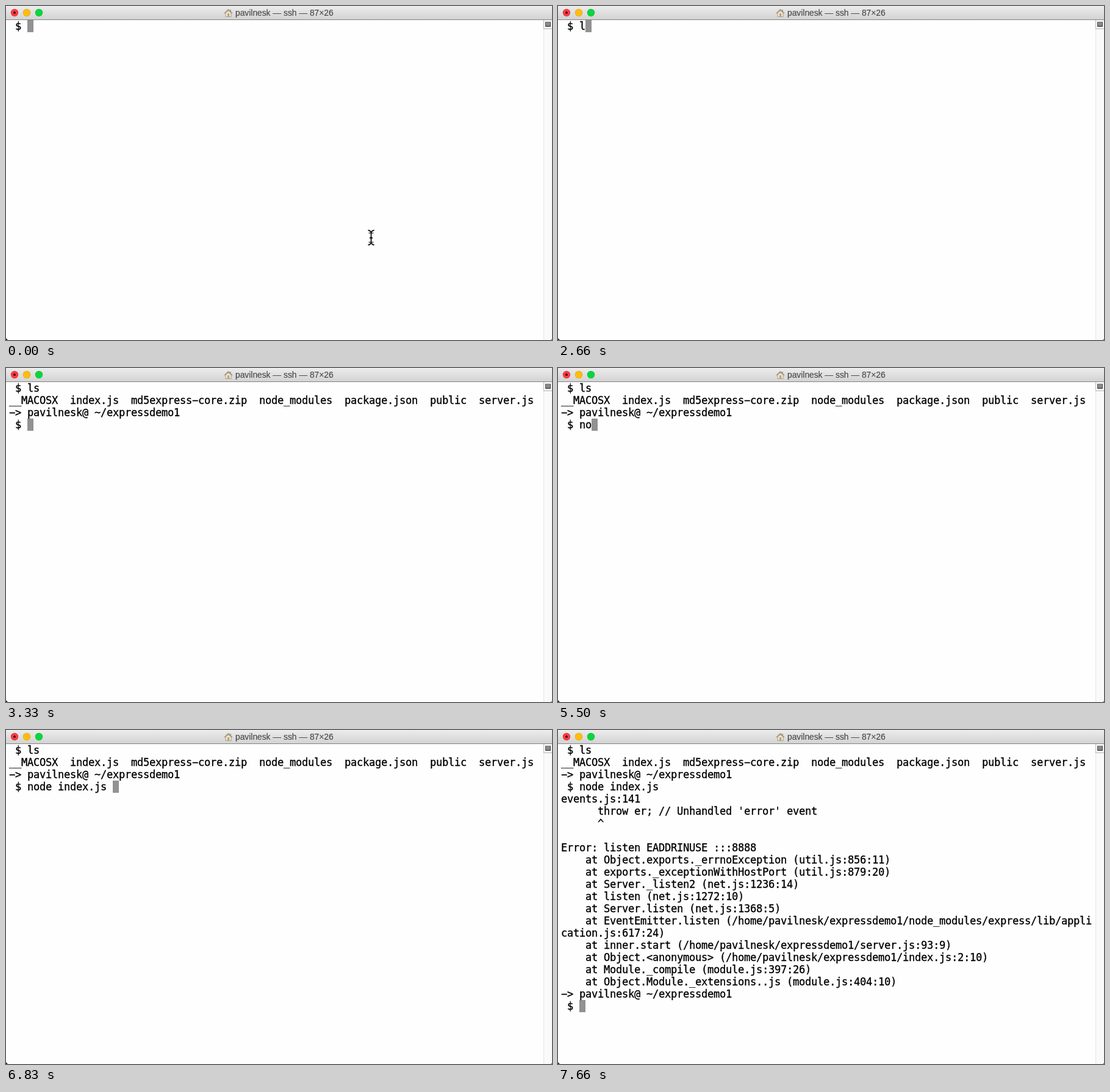
Animation, 895 px wide and 548 px high, one loop 8000 ms. Source, as an HTML page with a canvas:

```html
<!DOCTYPE html>
<html lang="en">
<head>
<meta charset="utf-8">
<title>Terminal</title>
<style>
html, body { margin: 0; width: 100%; height: 100%; overflow: hidden; background: #fefefe; }
canvas { display: block; }
</style>
</head>
<body>
<canvas id="stage" width="895" height="548"></canvas>
<script>
const ctx = document.getElementById('stage').getContext('2d');
const W = 895, H = 548, LOOP = 8000;
const CELL = 10, ROW = 20, LEFT = 5, TOP = 23;
const USER = 'pavilnesk';
const HOME = `/home/${USER}/expressdemo1`;
const PROMPT = ' $ ';

const listing = [
  '__MACOSX  index.js  md5express-core.zip  node_modules  package.json  public  server.js',
  `-> ${USER}@ ~/expressdemo1`
];

const trace = [
  'events.js:141',
  "      throw er; // Unhandled 'error' event",
  '      ^',
  '',
  'Error: listen EADDRINUSE :::8888',
  '    at Object.exports._errnoException (util.js:856:11)',
  '    at exports._exceptionWithHostPort (util.js:879:20)',
  '    at Server._listen2 (net.js:1236:14)',
  '    at listen (net.js:1272:10)',
  '    at Server.listen (net.js:1368:5)',
  `    at EventEmitter.listen (${HOME}/node_modules/express/lib/appli`,
  'cation.js:617:24)',
  `    at inner.start (${HOME}/server.js:93:9)`,
  `    at Object.<anonymous> (${HOME}/index.js:2:10)`,
  '    at Module._compile (module.js:397:26)',
  '    at Object.Module._extensions..js (module.js:404:10)',
  listing[1]
];

// [time, characters typed so far]
const firstKeys = [[0, 0], [2660, 1], [3000, 2]];
const secondKeys = [[3330, 0], [5500, 2], [5660, 3], [5830, 5], [6000, 6], [6160, 7], [6660, 8], [6830, 14]];
const LISTED = 3330, ENTERED = 7500, FAILED = 7660;

function typed(command, keys, t) {
  const count = keys.filter(k => k[0] <= t).pop()[1];
  return PROMPT + command.slice(0, count);
}

function screenLines(t) {
  const lines = [typed('ls', firstKeys, t)];
  if (t >= LISTED) lines.push(...listing, typed('node index.js ', secondKeys, t));
  if (t >= FAILED) lines.push(...trace, PROMPT);
  else if (t >= ENTERED) lines.push('');
  return lines;
}

function rect(x, y, w, h, color) {
  ctx.fillStyle = color;
  ctx.fillRect(x, y, w, h);
}

function disc(x, y, r, color) {
  ctx.fillStyle = color;
  ctx.beginPath();
  ctx.arc(x, y, r, 0, Math.PI * 2);
  ctx.fill();
}

function shape(points, color) {
  ctx.fillStyle = color;
  ctx.beginPath();
  points.forEach(([x, y]) => ctx.lineTo(x, y));
  ctx.fill();
}

// Text with a thin outline for a slightly heavier stroke
function label(text, x, y, weight) {
  ctx.lineWidth = weight;
  ctx.fillText(text, x, y);
  ctx.strokeText(text, x, y);
}

function light(x, fill, rim) {
  disc(x, 11, 6.2, rim);
  disc(x, 11, 5.5, fill);
}

function house() {
  shape([[359.5, 11], [364.5, 6.5], [369.5, 11], [369.5, 18], [359.5, 18]], '#a99f8e');
  shape([[360.5, 11.5], [364.5, 8], [368.5, 11.5], [368.5, 17], [360.5, 17]], '#ece5d3');
  rect(363, 12, 3, 5, '#c2a468');
  rect(367, 6, 2, 3, '#b5a694');
  ctx.strokeStyle = '#a18e7c';
  ctx.lineWidth = 1.3;
  ctx.beginPath();
  ctx.moveTo(358, 12);
  ctx.lineTo(364.5, 5.7);
  ctx.lineTo(371, 12);
  ctx.stroke();
}

function titleBar() {
  const g = ctx.createLinearGradient(0, 0, 0, 22);
  g.addColorStop(0, '#ececec');
  g.addColorStop(1, '#d3d3d3');
  rect(0, 0, W, 22, g);
  rect(0, 0, W, 1, '#f3f3f3');
  rect(0, 22, W, 1, '#828282');
  light(14, '#fc3b46', '#e2343f');
  disc(14, 11, 2, '#47060a');
  light(34, '#fdbd10', '#e3a611');
  light(54, '#0ad63f', '#0fbd39');
  house();
  ctx.font = '13.8px "Liberation Sans", Arial, sans-serif';
  ctx.fillStyle = ctx.strokeStyle = '#4c4c4c';
  label(`${USER} — ssh — 87×26`, 376, 16, 0.2);
}

function scrollBar() {
  rect(881, 23, 14, H - 23, '#fafafa');
  rect(881, 23, 1, H - 23, '#e6e6e6');
  rect(881, 23, 14, 15, '#b8b8b8');
  rect(882, 23, 13, 14, '#f6f6f6');
  rect(884, 26, 9, 8, '#4a4a4a');
  for (let y = 27; y < 33; y += 2) rect(885, y, 7, 1, '#c9c9c9');
}

function corners() {
  shape([[0, H - 3], [3, H], [0, H]], '#222');
  shape([[W, H - 2], [W, H], [W - 2, H]], '#777');
}

function terminal(lines) {
  const last = lines.length - 1;
  rect(LEFT + lines[last].length * CELL, TOP + last * ROW, CELL, ROW, '#929292');
  ctx.font = '17px "DejaVu Sans Mono", Menlo, monospace';
  ctx.fillStyle = ctx.strokeStyle = '#000';
  lines.forEach((line, row) => {
    // The minus sign gives the wide hyphen of the terminal face
    [...line.replaceAll('-', '−')].forEach((ch, col) => {
      if (ch !== ' ') label(ch, LEFT + col * CELL, TOP + 16 + row * ROW, 0.35);
    });
  });
}

function pointer(x, y) {
  ctx.save();
  ctx.translate(x, y);
  ctx.strokeStyle = '#111';
  ctx.lineWidth = 1.8;
  ctx.beginPath();
  ctx.moveTo(0, -9);
  ctx.lineTo(0, 9);
  for (const v of [-1, 1]) {
    for (const h of [-1, 1]) {
      ctx.moveTo(h * 5, v * 12);
      ctx.quadraticCurveTo(h, v * 11.5, 0, v * 8);
    }
  }
  ctx.moveTo(-2.5, 0.5);
  ctx.lineTo(2.5, 0.5);
  ctx.stroke();
  ctx.lineWidth = 1;
  ctx.beginPath();
  for (const v of [-7.5, 7.5]) {
    ctx.moveTo(-4, v);
    ctx.lineTo(4, v);
  }
  ctx.stroke();
  ctx.restore();
}

function draw(t) {
  rect(0, 0, W, H, '#fefefe');
  titleBar();
  scrollBar();
  terminal(screenLines(t));
  if (t < 660) pointer(598.5, 380);
  else if (t < 830) pointer(628.5, 312);
  corners();
}

ctx.lineJoin = 'round';
const start = performance.now();
function tick() {
  draw((performance.now() - start) % LOOP);
  requestAnimationFrame(tick);
}
tick();
</script>
</body>
</html>
```
